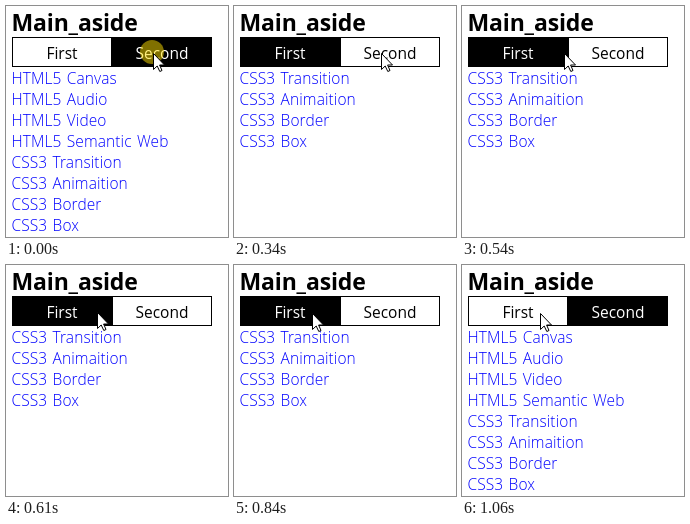
An HTML page for the animation above (1.14 s loop, 222x231 px).

```html
<!DOCTYPE html>
<html lang="en">
<head>
<meta charset="utf-8">
<title>Tab list</title>
<style>
  html, body { margin: 0; width: 100%; height: 100%; overflow: hidden; background: #fff; }
  svg { display: block; width: 222px; height: 231px; }
  text { font: 15.5px "Open Sans", "Noto Sans", sans-serif; }
  .title { font-size: 23px; font-weight: 700; letter-spacing: -.15px; }
  .tab text { text-anchor: middle; }
  .tab rect { stroke: #000; }
  .list { fill: #00f; }
  .list text { font-weight: 350; letter-spacing: .1px; word-spacing: 1.2px; }

  .html, .css, .tab *, .glow, .pointer { animation: 1140ms step-end infinite; }
  .html { animation-name: show; }
  .css { animation-name: slide; }
  .tab .box-a, .tab .label-b { animation-name: light; }
  .tab .box-b, .tab .label-a { animation-name: dark; }
  .glow { animation-name: press; }
  .pointer { animation-name: move; }

  @keyframes show  { 0%, 82.456% { visibility: visible } 12.281% { visibility: hidden } }
  @keyframes slide { 0%, 82.456% { transform: translateY(84px) } 12.281% { transform: none } }
  @keyframes light { 0%, 82.456% { fill: #fff } 12.281% { fill: #000 } }
  @keyframes dark  { 0%, 82.456% { fill: #000 } 12.281% { fill: #fff } }
  @keyframes press { 0% { visibility: visible } 12.281%, 100% { visibility: hidden } }
  @keyframes move {
    0%      { transform: translate(147px, 47px) }
    41.228% { transform: translate(129px, 47px) }
    47.368% { transform: translate(102px, 47px) }
    53.509% { transform: translate(91px, 47px) }
    59.649%, 100% { transform: translate(78px, 48px) }
  }
</style>
</head>
<body>
<svg viewBox="0 0 222 231">
  <text class="title" x="5.5" y="25">Main_aside</text>
  <g class="tab">
    <rect class="box-a" x="6.5" y="31.5" width="99" height="29"/>
    <text class="label-a" x="56" y="53">First</text>
  </g>
  <g class="tab">
    <rect class="box-b" x="106.5" y="31.5" width="99" height="29"/>
    <text class="label-b" x="156" y="53">Second</text>
  </g>
  <g class="list">
    <g class="html">
      <text x="5.5" y="78">HTML5 Canvas</text>
      <text x="5.5" y="99">HTML5 Audio</text>
      <text x="5.5" y="120">HTML5 Video</text>
      <text x="5.5" y="141">HTML5 Semantic Web</text>
    </g>
    <g class="css">
      <text x="5.5" y="78">CSS3 Transition</text>
      <text x="5.5" y="99">CSS3 Animaition</text>
      <text x="5.5" y="120">CSS3 Border</text>
      <text x="5.5" y="141">CSS3 Box</text>
    </g>
  </g>
  <circle class="glow" cx="146" cy="46" r="12" fill="#ffe000" fill-opacity=".5"/>
  <path class="pointer" d="M.5.5V16.5L4.2 13 6.8 18.5 9 17.5 6.6 12H11.5Z" fill="#fff" stroke="#000"/>
</svg>
</body>
</html>
```
